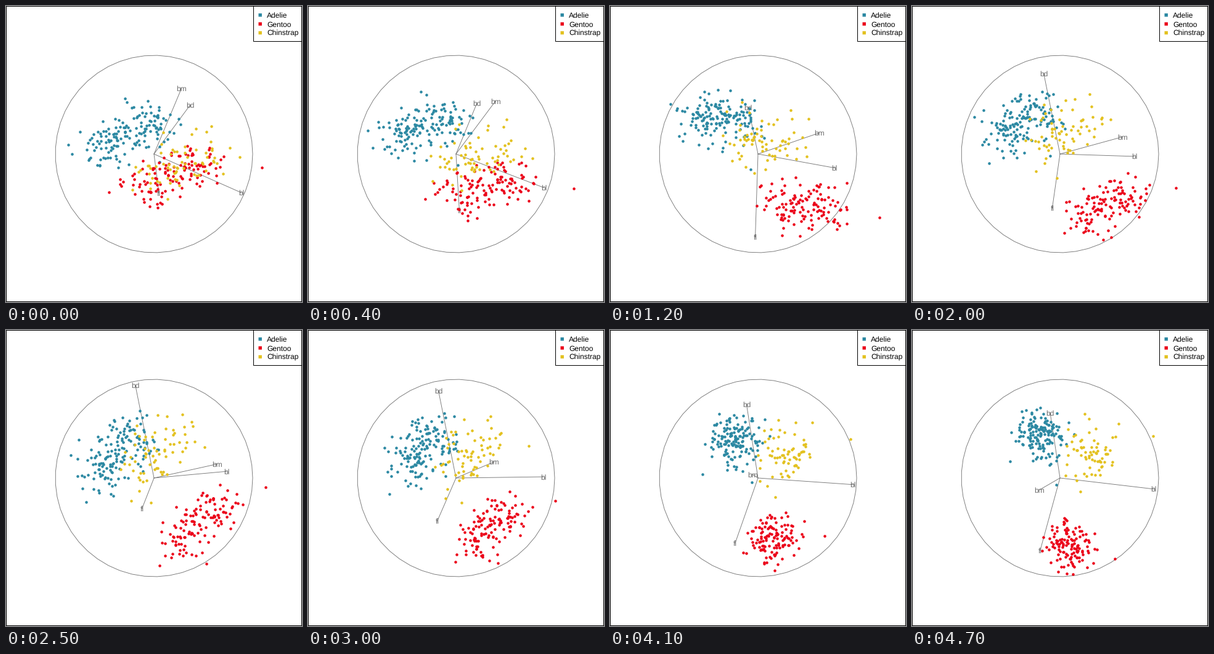
Recreate the animation shown at these times as a matplotlib script. Size 480x480 px, loop 4800 ms.

```python
import numpy as np
import matplotlib.pyplot as plt
from matplotlib.animation import FuncAnimation
from matplotlib.patches import Polygon, Rectangle

SIZE, DPI = 480, 100
FRAMES, INTERVAL = 48, 100
CENTRE, RADIUS, SPREAD = 240, 160, 1.64
PX = 72 / DPI  # one pixel in points
GREY = "#757575"
plt.rcParams["font.family"] = "Liberation Sans"
plt.rcParams["text.hinting"] = "none"

# Variables: bill length, bill depth, flipper length, body mass
LABELS = ["bl", "bd", "fl", "bm"]
MEAN = np.array([43.92, 17.15, 200.92, 4201.75])
RANGE = np.array([27.5, 8.4, 59, 3600])
SD = np.array([2.3, .8, 5.8, 300])
SEX_GAP = np.array([3.6, 1.5, 6.8, 680])

# Per group: colour, number of birds, mean, one bird far from the rest
GROUPS = {
    "Adelie": ("#2b88a2", 151, [38.8, 18.35, 190, 3700], [44.1, 18, 210, 4000]),
    "Gentoo": ("#eb0018", 123, [47.5, 14.98, 217.2, 5076], [59.6, 17, 230, 6050]),
    "Chinstrap": ("#e3c11f", 68, [48.8, 18.4, 195.8, 3733], [58, 17.8, 181, 3700]),
}

# The tour's stops: time and axis tips in pixels from the centre, y up
STOPS = {
    0: [[141, -63], [58, 79], [8, -63], [44, 106]],
    1200: [[124, -23], [-16, 76], [-4, -135], [99, 34]],
    2500: [[117, 10], [-31, 150], [-19, -49], [102, 22]],
    3500: [[152, -6], [-23, 129], [-39, -89], [16, 30]],
    4700: [[152, -18], [-16, 105], [-32, -117], [-33, -19]],
}


def sample(rng, count, mean, outlier):
    """Correlated normal birds, females and males in turn, plus the outlier."""
    shared = rng.standard_normal((count - 1, 1))
    own = rng.standard_normal((count - 1, 4))
    z = np.clip(.5 * shared + .866 * own, -2.1, 2.1)
    sex = np.arange(count - 1)[:, None] % 2 - .5
    birds = np.array(mean) + sex * SEX_GAP + z * SD
    return (np.vstack([birds, outlier]) - MEAN) / RANGE


def basis(t):
    """Orthonormal 4 x 2 projection at time t, between the nearest stops."""
    tips = np.array(list(STOPS.values())).reshape(len(STOPS), -1)
    raw = [np.interp(t, list(STOPS), col) for col in tips.T]
    u, _, vt = np.linalg.svd(np.reshape(raw, (4, 2)), full_matrices=False)
    return u @ vt


def to_stage(xy):
    return CENTRE + RADIUS * xy


def box(x, y, w, h, **style):
    ax.add_patch(Rectangle((x, y), w, h, snap=False, **style))


fig = plt.figure(figsize=(SIZE / DPI, SIZE / DPI), dpi=DPI, facecolor="white")
ax = fig.add_axes([0, 0, 1, 1])
ax.set(xlim=(0, SIZE), ylim=(0, SIZE))
ax.axis("off")

theta = np.linspace(0, 2 * np.pi, 50)[:-1]
ring = to_stage(np.column_stack([np.cos(theta), np.sin(theta)]))
ax.add_patch(Polygon(ring, fc="none", ec=GREY, lw=.9 * PX, zorder=1))

spokes = [ax.plot([], [], color=GREY, lw=.9 * PX, snap=False, zorder=1)[0]
          for _ in LABELS]
names = [ax.text(0, 0, s, color="#6c6c6c", size=12 * PX, ha="center",
                 va="baseline", zorder=2) for s in LABELS]

# Frame and legend box
box(.5, .5, SIZE - 1, SIZE - 1, fc="none", ec="black", lw=PX, zorder=10)
box(401.5, 422.5, 78, 57, fc="white", ec="black", lw=PX, zorder=8)

rng = np.random.default_rng(5)
clouds = []
for i, (group, (colour, *stats)) in enumerate(GROUPS.items()):
    dots, = ax.plot([], [], "o", color=colour, ms=4.5 * PX, mew=0,
                    snap=False, zorder=3 + i)
    clouds.append((dots, sample(rng, *stats)))
    y = SIZE - 14.7 - 14.4 * i
    box(409.5, y - 2.7, 5.4, 5.4, fc=colour, lw=0, zorder=9)
    ax.text(423, y - 4.3, group, size=12 * PX, color="black", zorder=9)


def update(i):
    proj = basis(i * INTERVAL)
    for spoke, name, (x, y) in zip(spokes, names, to_stage(proj)):
        spoke.set_data([CENTRE, x], [CENTRE, y])
        name.set_position((x, y - 4.3))
    for dots, data in clouds:
        dots.set_data(*to_stage(SPREAD * data @ proj).T)
    return spokes + names + [dots for dots, _ in clouds]


anim = FuncAnimation(fig, update, frames=FRAMES, interval=INTERVAL,
                     repeat=True, repeat_delay=0, blit=False)
plt.show()
```
